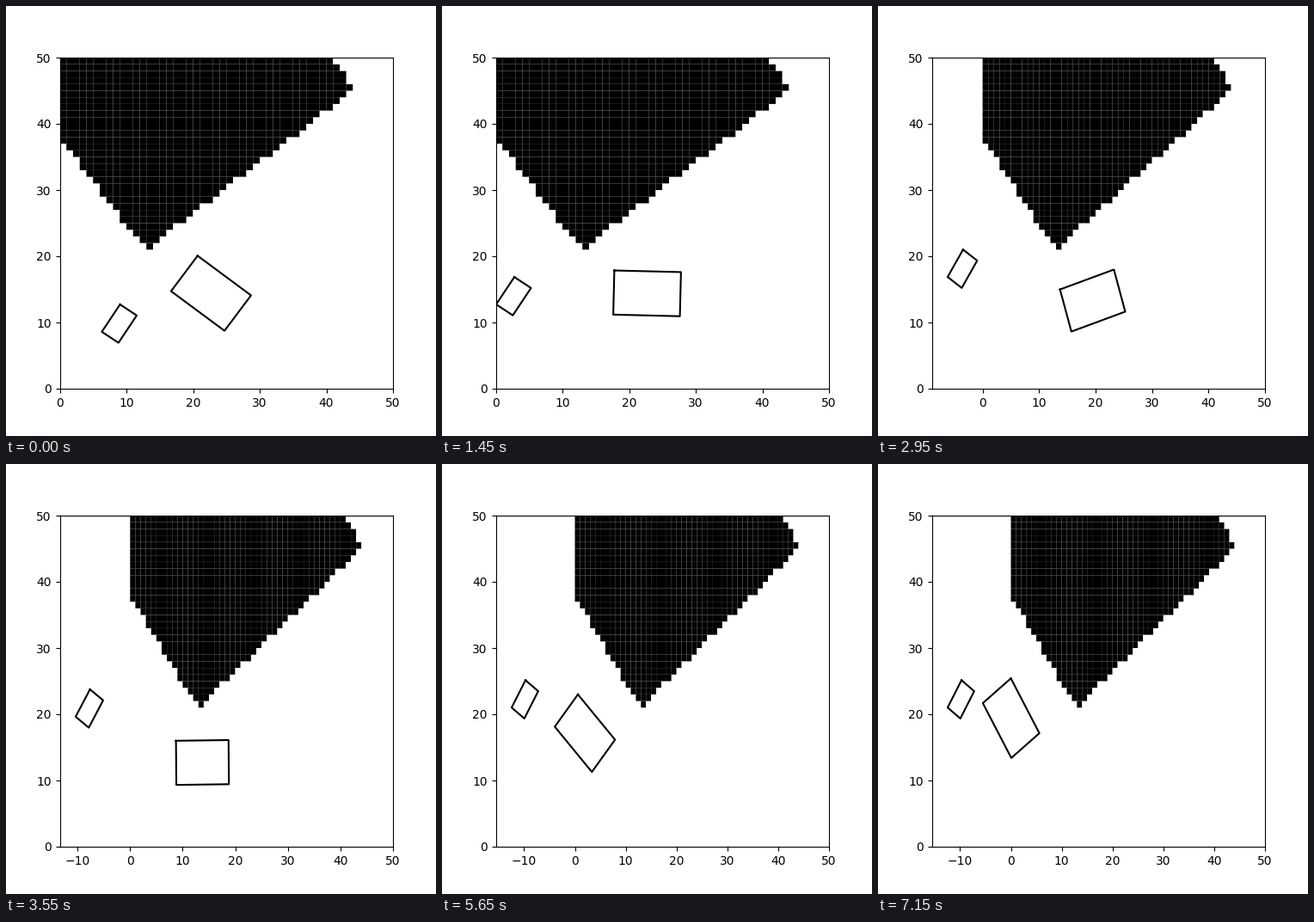
These frames come from a looping animation (500x500 px, 8000 ms). A matplotlib script:

```python
import numpy as np
import matplotlib.pyplot as plt
from matplotlib.animation import FuncAnimation

SIZE = 50
INTERVAL, LOOP = 50, 8000

SMALL_START = np.array([8.93, 9.83])
SMALL_ANGLE = -33.5
STRIDE = 2.5

# Bursts of updates: (start in ms, number of ticks).
SMALL_PERIOD, SMALL_BURSTS = 494, [(10, 9)]
LARGE_PERIOD = 500 / 3
LARGE_BURSTS = [(100, 1), (1100, 13), (3350, 3), (4300, 1), (5633, 10)]

# Key poses of the large box: tick count, centre x, centre y, heading.
LARGE_POSES = np.array([
    (0, 22.70, 14.41, -36.7),
    (4, 22.71, 14.40, -1.4),
    (7, 22.37, 14.39, 10.0),
    (11, 21.13, 13.95, 20.5),
    (13, 19.48, 13.31, 17.5),
    (17, 11.85, 12.52, -5.0),
    (18, 2.58, 16.64, -40.1),
    (19, 1.97, 17.14, -43.1),
    (25, 0.10, 19.32, -55.4),
    (28, 0.04, 19.41, -55.9),
])


def occupancy():
    """Cells covered by a tilted rectangle that runs off the top left."""
    x, y = np.meshgrid(np.arange(SIZE), np.arange(SIZE))
    rise = y - 21
    left = np.floor(13 - 0.755 * rise)
    right = np.floor(14 + 1.299 * rise)
    cap = np.floor(44.6 - 0.755 * (rise - 24))
    return (rise >= 0) & (x >= left) & (x < np.minimum(right, cap))


def tick_count(ms, period, bursts):
    return sum(np.clip((ms - start) // period + 1, 0, ticks)
               for start, ticks in bursts)


def box_outline(center, width, height, degrees):
    a = np.radians(degrees)
    x = np.array([-1, 1, 1, -1, -1]) * width / 2
    y = np.array([1, 1, -1, -1, 1]) * height / 2
    return (center[0] + x * np.cos(a) - y * np.sin(a),
            center[1] + x * np.sin(a) + y * np.cos(a))


def small_outline(ms):
    a = np.radians(SMALL_ANGLE)
    travelled = STRIDE * tick_count(ms, SMALL_PERIOD, SMALL_BURSTS)
    center = SMALL_START - travelled * np.array([np.cos(a), np.sin(a)])
    return box_outline(center, 3, 4.95, SMALL_ANGLE)


def large_outline(ms):
    ticks = tick_count(ms, LARGE_PERIOD, LARGE_BURSTS)
    x, y, degrees = (np.interp(ticks, LARGE_POSES[:, 0], column)
                     for column in LARGE_POSES.T[1:])
    return box_outline((x, y), 10, 20 / 3, degrees)


fig, ax = plt.subplots(figsize=(5, 5), dpi=100)
# Invisible edges snap the cells to half pixels, which leaves faint seams.
ax.pcolor(occupancy().astype(float), cmap="binary", vmin=0, vmax=1,
          edgecolors=(1, 1, 1, 0), linewidths=0.25)
ax.set_ylim(0, SIZE)
small, = ax.plot([], [], "k-", lw=1.5)
large, = ax.plot([], [], "k-", lw=1.5)


def update(frame):
    ms = frame * INTERVAL
    small.set_data(*small_outline(ms))
    large.set_data(*large_outline(ms))
    # Widen the view with a 5 % margin once a box leaves the grid.
    xmin = min(small.get_xdata().min(), large.get_xdata().min())
    ax.set_xlim(xmin - 0.05 * (SIZE - xmin) if xmin < 0 else 0, SIZE)
    return small, large


anim = FuncAnimation(fig, update, frames=LOOP // INTERVAL, interval=INTERVAL,
                     repeat=True, repeat_delay=0, blit=False)
plt.show()
```
